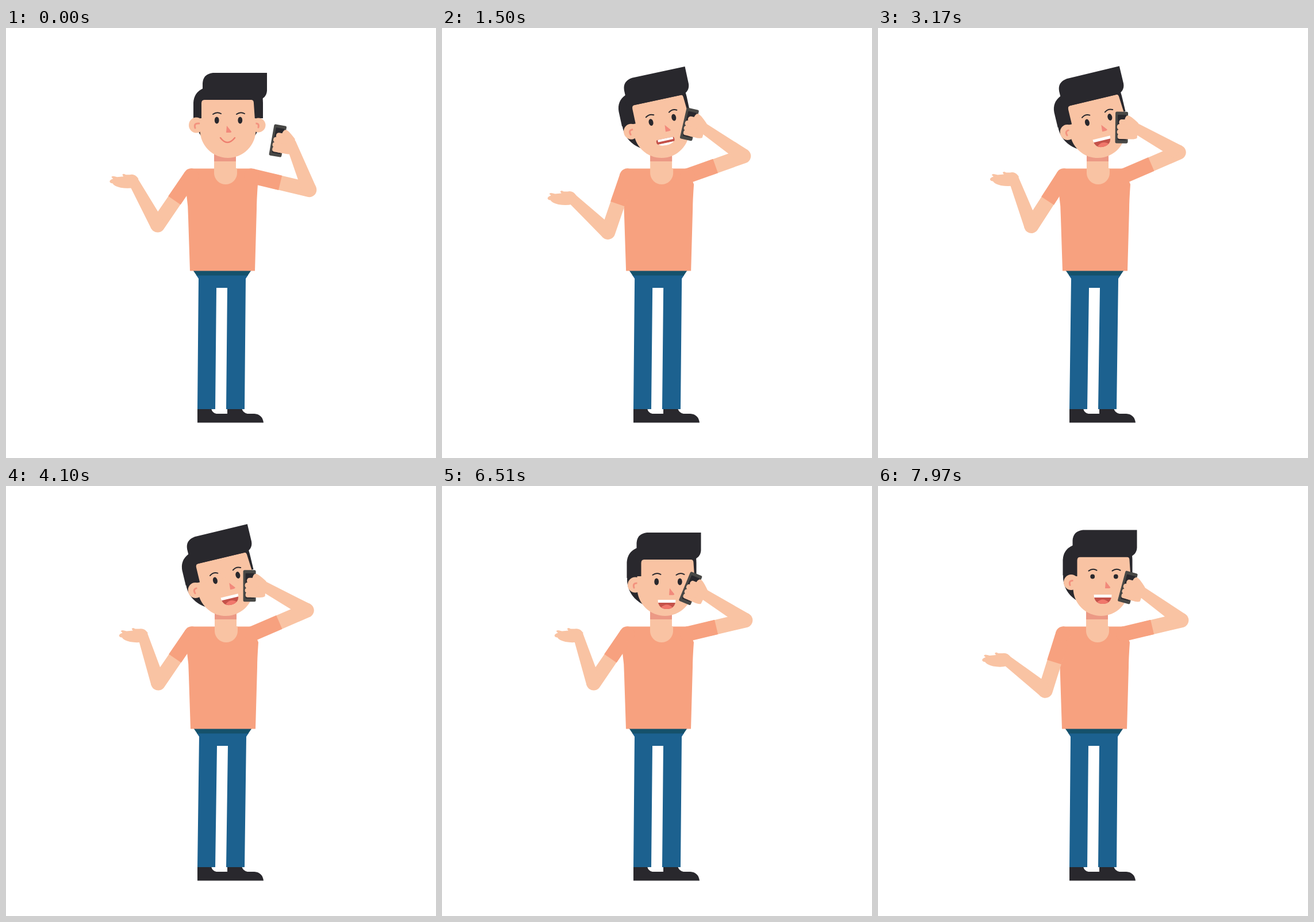
These frames come from a looping animation (748x748 px, 8000 ms). An HTML page:

```html
<!DOCTYPE html>
<html lang="en">
<head>
<meta charset="utf-8">
<title>Man on the phone</title>
<style>
  html, body { margin: 0; height: 100%; overflow: hidden; background: #fff; }
  svg { display: block; width: 100vw; height: 100vh; }
  .skin { fill: #f9c3a3; }
  .shirt { fill: #f7a17f; }
  .dark { fill: #29282d; }
  .line { fill: none; stroke: #29282d; stroke-width: 2; stroke-linecap: round; }
  .fold { fill: none; stroke: #f3937f; stroke-width: 3; stroke-linecap: round; }
  .limb { stroke: #f9c3a3; stroke-width: 25.5; stroke-linecap: round; }
  .sleeve { stroke: #f7a17f; stroke-width: 26; }
  .lips { fill: #c4524a; }
  .tongue { fill: #f0776b; }
  .teeth { fill: #fff; }
</style>
</head>
<body>
<svg viewBox="0 0 748 748">
  <defs>
    <g id="upperArm">
      <path class="limb" d="M40,0H103.4"/>
      <path class="sleeve" d="M0,0H51.5"/>
      <circle class="shirt" r="13"/>
    </g>
    <path id="forearm" class="skin" d="M0,-12.7L87,-9A9,9 0 0 1 87,9L0,12.7z"/>
  </defs>

  <path class="dark" d="M333,662H357Q359,670 366,671H385V662H410Q413,670 420,671H432Q446,672 448,686.500H333z"/>
  <path id="legs" fill="#1c618f"/>

  <g id="body">
    <path fill="#15516b" d="M325,421H427L420.500,430.500H331.500z"/>
    <path class="shirt" d="M322,244.500H427L438,272Q436,300 436,315L433,422.500H320L317,330Q317,310 314,290L310,257z"/>
    <path class="skin" d="M362,205H400V244H402V252A20,20 0 0 1 362,252z"/>
    <path fill="#ec9985" d="M362,205H400V232H362z"/>

    <g id="leftArm">
      <use href="#upperArm"/>
      <g id="leftElbow">
        <use href="#forearm"/>
        <path id="leftHand" class="skin" d="M9,-4Q3,-13 -6,-11L-13,-11Q-17,-14 -19,-11L-17,-8L-28,-7Q-37,-10 -38,-7L-35,-4Q-41,-2 -41,1Q-40,4 -36,4Q-33,9 -22,11.500Q-8,14 2,11z"/>
      </g>
    </g>

    <g id="head">
      <ellipse id="backHair" class="dark" cx="386" cy="160" rx="56" ry="50"/>
      <path id="hairSides" class="dark" d="M326,157V130Q327,112 343,105H440Q447,112 447,130V157z"/>
      <g id="rightEar">
        <circle class="skin" cx="439" cy="169" r="12.500"/>
        <path class="fold" d="M433,166Q441,165 439,173"/>
      </g>
      <g id="leftEar">
        <ellipse class="skin" cx="331" cy="169" rx="13" ry="13.500"/>
        <path class="fold" d="M336,166Q326,165 329,174"/>
      </g>
      <path id="jaw" class="skin" d="M337.500,157H434.500V177.500A48.500,48.500 0 0 1 337.500,177.500z"/>
      <path id="forehead" class="skin" d="M340,160V131Q340,125 345,125H427Q431,125 431,131L433,160z"/>
      <path id="quiff" class="dark" d="M342,110V96Q343,80 360,78H454V109Q453,122 440,125H340V108z"/>
      <path id="brows" class="line" d="M360,150Q367,145 374,149M401,150Q408,145 415,149"/>
      <g id="eyes">
        <ellipse class="dark" cx="366.700" cy="160.500" rx="3.900"/>
        <ellipse class="dark" cx="407.300" cy="160.500" rx="3.900"/>
      </g>
      <path id="nose" fill="#f2897b" d="M384,170L392,180Q393,182 388,182L383,182z"/>
      <g id="mouth">
        <path id="smile" fill="none" stroke="#ee7f6f" stroke-width="2.500" stroke-linecap="round" d="M-12,-1Q0,15 13,-1"/>
        <g id="open">
          <path class="lips" d="M-15,4H15Q13,16 0,16Q-13,16 -15,4z"/>
          <path class="tongue" d="M-10,13Q0,4 10,13Q6,16 0,16Q-6,16 -10,13z"/>
          <path class="teeth" d="M-15.500,0H15.500L15,5H-15z"/>
        </g>
        <g id="grin">
          <rect class="lips" x="-16" y="1" width="32" height="8" rx="3"/>
          <path class="teeth" d="M-13,1H14V5H-13zM-13,9H14Q10,13 0,13Q-10,13 -13,9z"/>
        </g>
        <g id="sad">
          <path class="lips" d="M-12,3Q0,0 12,3Q16,6 16,11Q15,13 12,13H-12Q-16,14 -16,10Q-16,6 -12,3z"/>
          <path class="tongue" d="M-8,13Q0,4 9,13z"/>
          <path class="teeth" d="M-13,5Q-11,1 0,1Q11,1 13,5Q0,7 -13,5z"/>
        </g>
      </g>
    </g>

    <g id="rightArm">
      <use href="#upperArm"/>
      <g id="rightElbow">
        <use href="#forearm"/>
        <g id="rightHand">
          <rect x="-34" y="-27.500" width="22" height="55" rx="2.500" fill="#484846"/>
          <rect x="-30" y="-22" width="15" height="44" rx="1" class="dark"/>
          <g class="skin">
            <path d="M-18,-12Q-17,-21 -12,-21Q-8,-21 6,-8L4,18Q0,21 -10,20H-20z"/>
            <rect x="-27.500" y="-14" width="20" height="10" rx="4.500"/>
            <rect x="-31" y="-6" width="24" height="10" rx="4.500"/>
            <rect x="-31" y="3" width="24" height="9.500" rx="4.500"/>
            <rect x="-30" y="11" width="24" height="9" rx="4"/>
          </g>
        </g>
      </g>
    </g>
  </g>
</svg>
<script>
const LOOP = 8000;
const BEAT = 160;
const UPPER_ARM = 103.4, FOREARM = 87.5;
const speech = ["smile", "open", "sad", "grin", "open", "grin"];
const blinks = [2340, 8050];
const el = id => document.getElementById(id);

function place(id, x, y, angle = 0) {
  el(id).setAttribute("transform", `translate(${x} ${y}) rotate(${angle})`);
}

// Angles are absolute; each joint turns relative to the one before it.
function poseArm(side, shoulderX, upper, fore, hand) {
  place(side + "Arm", shoulderX, 257.3, upper);
  place(side + "Elbow", UPPER_ARM, 0, fore - upper);
  place(side + "Hand", FOREARM, 0, hand - fore);
}

function drawLegs(sway) {
  const hip = x => x + sway;
  el("legs").setAttribute("d",
    `M${hip(331)},430H${hip(421)}L${hip(417)},436L415,663H383L${hip(385)},452` +
    `H${hip(366)}L364,663H333L${hip(335)},436z`);
}

function poseHead(tilt, turn, nod) {
  el("head").setAttribute("transform", `rotate(${tilt} 385 206)`);
  place("backHair", -8 * turn, nod / 2);
  place("hairSides", -4.5 * turn, nod / 2);
  place("quiff", -3.5 * turn, nod / 2);
  place("leftEar", 5 * turn, nod / 2);
  place("rightEar", -18 * turn, nod / 2);
  place("jaw", 2 * turn, 0);
  place("forehead", 6.5 * turn, nod / 2);
  place("brows", 6.5 * turn, nod * 0.8);
  place("eyes", 6.5 * turn, nod);
  place("nose", 12 * turn, nod * 1.3);
  place("mouth", 385 + 6 * turn, 192 + nod);
}

function drawFace(t) {
  const gap = Math.min(...blinks.map(b => Math.abs(t - b)));
  const openness = Math.min(6, Math.max(0.8, (gap - 30) / 12));
  for (const eye of el("eyes").children) eye.setAttribute("ry", openness);

  const shape = speech[Math.floor(t / BEAT) % speech.length];
  for (const mouth of el("mouth").children) {
    mouth.style.display = mouth.id === shape ? "" : "none";
  }
}

function draw(t) {
  const ease = (start, end) => {
    const u = Math.min(1, Math.max(0, (t - start) / (end - start)));
    return u * u * (3 - 2 * u);
  };

  // Gestures, each from 0 to 1
  const answer = ease(0, 1870);
  const upright = ease(4200, 4990);
  const dip = ease(0, 770) - ease(770, 1870);
  const lean = answer - upright;
  const shift = ease(2500, 3300);
  const away = ease(4200, 5100) - ease(5350, 5840);
  const start = 1 - ease(0, 740);
  const low = ease(0, 740) - ease(2500, 3330);
  const drop = ease(6640, 7600);

  const sway = lean - 5.5 * away - 2.9 * dip;
  const nod = away + 6 * ease(5700, 6450) - 9 * drop;
  place("body", sway, 0);
  drawLegs(sway);
  poseHead(-13.5 * lean, ease(500, 1700), nod);
  drawFace(t);

  poseArm("left", 322,
    124.3 - 15.4 * low - 16.9 * drop + 16.8 * away,
    252 - 11 * start - 29 * low - 34 * drop + 4 * away,
    52 * away);

  const upper = 13.5 - 36.8 * answer + 10 * upright + 8 * away;
  const bend = 235 + 1.5 * answer - 7.3 * dip - 4 * shift - 7 * upright + 3.5 * drop;
  const phone = 10 - answer + 14.5 * dip - 9 * shift + 22.5 * upright - 7.5 * drop;
  poseArm("right", 427, upper, upper + bend, phone);
}

function frame() {
  draw(performance.now() % LOOP);
  requestAnimationFrame(frame);
}
frame();
</script>
</body>
</html>
```
